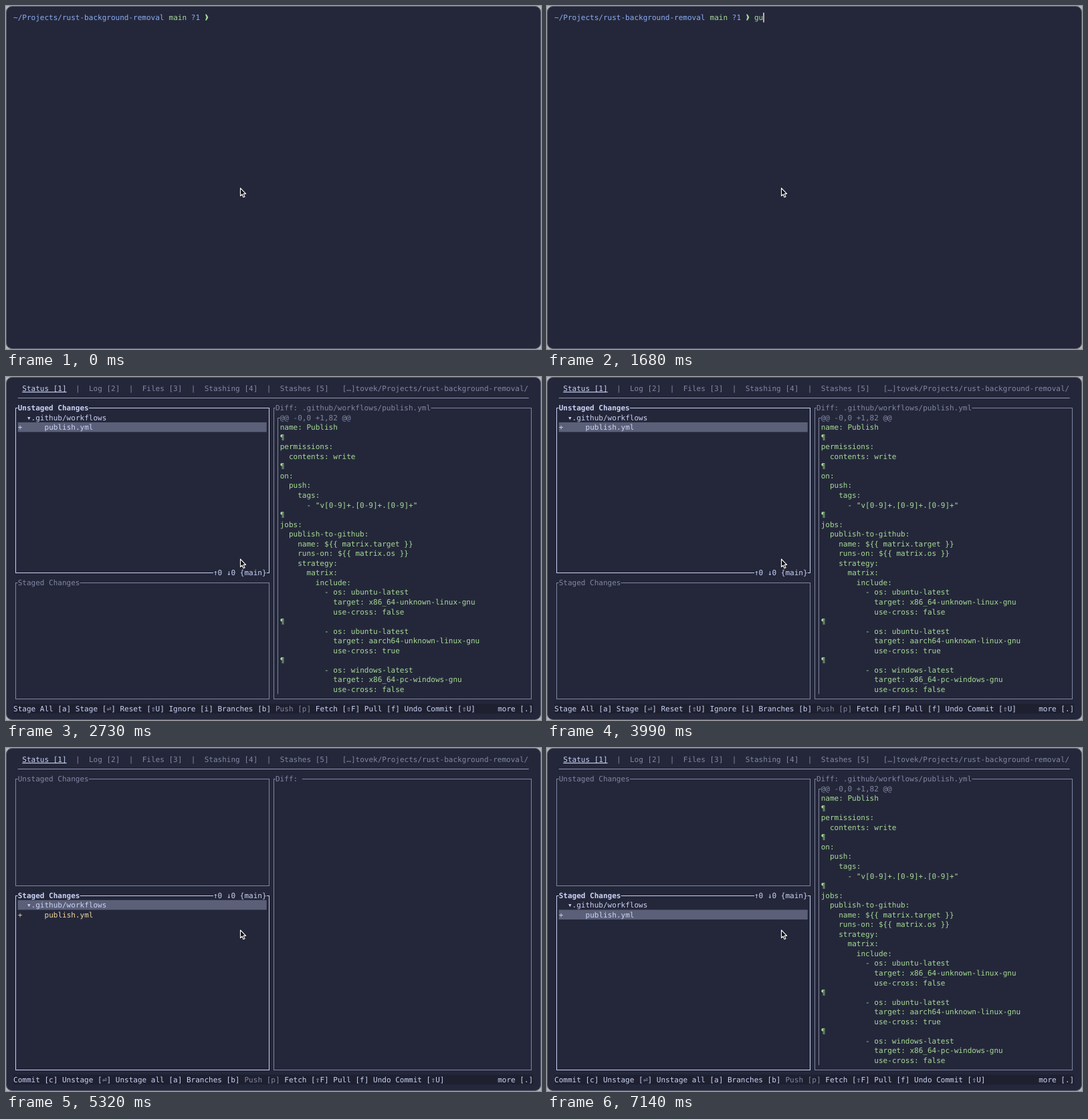
An HTML page for the animation above (8 s loop, 800x514 px).

```html
<!DOCTYPE html>
<html lang="en">
<head>
<meta charset="utf-8">
<title>Terminal git session</title>
<style>
  html, body { margin: 0; width: 100%; height: 100%; overflow: hidden; background: #b4b5ba; }
  svg { display: block; width: 800px; height: 514px; }
  text {
    font: 11.036px "DejaVu Sans Mono", "Noto Sans Mono", monospace;
    text-rendering: geometricPrecision;
    white-space: pre;
  }
  .bold { font-weight: bold; }
  .under { text-decoration: underline; }
</style>
</head>
<body>
<svg id="stage" viewBox="0 0 800 514"></svg>
<script>
const LOOP = 8000, CELL = 6.644, ROW = 14.545;
const C = {
  bg: '#24273a', bar: '#1e2030', text: '#cad3f5', dim: '#8087a2', rule: '#9197b3',
  sel: '#5b6078', green: '#a6da95', yellow: '#eed49f', blue: '#8aadf4', caret: '#f4dbd6'
};
const stage = document.getElementById('stage');
const X = col => 11 + col * CELL;
const Y = row => 17 + row * ROW;
const snap = v => Math.round(v) + 0.5;

function add(parent, tag, attrs = {}) {
  const el = document.createElementNS('http://www.w3.org/2000/svg', tag);
  for (const k in attrs) el.setAttribute(k, attrs[k]);
  parent.append(el);
  return el;
}

// Symbols get their own run so a fallback glyph cannot shift the grid.
function put(g, col, row, str, fill, cls = '') {
  const t = add(g, 'text', { y: Y(row) + 4, fill, class: cls });
  for (const m of str.matchAll(/[⇧⏎▾↑↓…¶]|[^⇧⏎▾↑↓…¶]+/g))
    add(t, 'tspan', { x: X(col + m.index) }).textContent = m[0];
}

function block(g, col, row, cols, fill) {
  add(g, 'rect', { x: X(col), y: Y(row) - ROW / 2, width: cols * CELL, height: ROW, fill });
}

function label(g, col, row, str, fill, cls) {
  block(g, col, row, str.length, C.bg);
  put(g, col, row, str, fill, cls);
}

function panel(g, c0, r0, c1, r1, title, active) {
  const x = snap(X(c0 + 0.5)), y = snap(Y(r0)), color = active ? C.text : C.dim;
  add(g, 'rect', {
    x, y, width: snap(X(c1 + 0.5)) - x, height: snap(Y(r1)) - y, fill: 'none', stroke: color
  });
  label(g, c0 + 1, r0, title, color, active ? 'bold' : '');
}

// Visible only inside the given [start, end] spans, with hard cuts.
function layer(parent, ...spans) {
  const g = add(parent, 'g');
  const keys = spans[0][0] > 0 ? [{ offset: 0, opacity: 0 }] : [];
  for (const [a, b] of spans)
    keys.push({ offset: a / LOOP, opacity: 1 }, { offset: b / LOOP, opacity: 0 });
  if (keys.at(-1).offset < 1) keys.push({ offset: 1, opacity: 0 });
  for (const k of keys) k.easing = 'step-end';
  g.animate(keys, { duration: LOOP, iterations: Infinity });
  return g;
}

function caret(col, ...spans) {
  add(layer(stage, ...spans), 'rect', { x: X(col), y: 10, width: 1.5, height: 14.5, fill: C.caret });
}

function tree(g, row, picked) {
  block(g, 1, row + picked, 56, C.sel);
  put(g, 3, row, '▾.github/workflows', C.text);
  const color = picked ? C.text : C.yellow;
  put(g, 1, row + 1, '+', color);
  put(g, 7, row + 1, 'publish.yml', color);
}

function commands(g, before, after) {
  const push = 'Push [p] ';
  put(g, 0, 33, before, C.text);
  put(g, before.length, 33, push, C.dim);
  put(g, before.length + push.length, 33, after, C.text);
}

add(stage, 'rect', { x: 0.5, y: 0.5, width: 799, height: 513, rx: 8.5, fill: C.bg, stroke: '#5b5e6d' });

// Shell prompt
const shell = layer(stage, [0, 1750]);
put(shell, 0, 0, '~/Projects/rust-background-removal', C.blue);
put(shell, 35, 0, 'main', C.green);
put(shell, 40, 0, '?1', C.blue);
add(shell, 'path', { d: 'M298 12.5h1.9l2.5 4.5-2.5 4.5H298l1.6-4.5z', fill: C.green });
put(layer(stage, [490, 1750]), 45, 0, 'g', C.green);
put(layer(stage, [490, 630]), 46, 0, 'u', C.sel);
put(layer(stage, [630, 1750]), 46, 0, 'u', C.green);
caret(45, [280, 490]);
caret(46, [490, 630]);
caret(47, [630, 1260], [1680, 1750]);

// Git interface: parts that stay
const ui = layer(stage, [1750, LOOP]);
const tabs = [[17, 'Log [2]'], [29, 'Files [3]'], [43, 'Stashing [4]'], [60, 'Stashes [5]']];
put(ui, 2, 0, 'Status [1]', C.text, 'under');
for (const [col, name] of tabs) {
  put(ui, col - 3, 0, '|', C.dim);
  put(ui, col, 0, name, C.dim);
}
put(ui, 74, 0, '[…]tovek/Projects/rust-background-removal/', C.dim);
add(ui, 'path', { d: `M${X(1)} 31.5H${X(116)}`, stroke: C.rule });
block(ui, 0, 33, 117, C.bar);
put(ui, 109, 33, 'more [.]', C.text);

// Focus on the unstaged list, then on the staged list
const branch = '↑0 ↓0 {main}';
const work = layer(ui, [1750, 5320]);
panel(work, 0, 2, 57, 19, 'Unstaged Changes', true);
panel(work, 0, 20, 57, 32, 'Staged Changes', false);
label(work, 45, 19, branch, C.text);
commands(work, 'Stage All [a] Stage [⏎] Reset [⇧U] Ignore [i] Branches [b] ',
  'Fetch [⇧F] Pull [f] Undo Commit [⇧U]');

const index = layer(ui, [5320, LOOP]);
panel(index, 0, 2, 57, 13, 'Unstaged Changes', false);
panel(index, 0, 14, 57, 32, 'Staged Changes', true);
label(index, 45, 14, branch, C.text);
commands(index, 'Commit [c] Unstage [⏎] Unstage all [a] Branches [b] ',
  'Fetch [⇧F] Pull [f] Undo Commit [⇧U]');

tree(layer(ui, [1750, 2730]), 3, 0);
tree(layer(ui, [2730, 5320]), 3, 1);
tree(layer(ui, [5320, 7000]), 15, 0);
tree(layer(ui, [7000, LOOP]), 15, 1);

// Diff panel
panel(layer(ui, [1750, 2730], [5320, 7000]), 58, 2, 116, 32, 'Diff: ', false);
const diff = layer(ui, [2730, 5320], [7000, LOOP]);
panel(diff, 58, 2, 116, 32, 'Diff: .github/workflows/publish.yml', false);
add(diff, 'path', {
  d: `M${X(60)} ${snap(Y(3))}H${snap(X(59.5))}V${Y(31.5)}`, fill: 'none', stroke: C.dim
});
put(diff, 60, 3, '@@ -0,0 +1,82 @@', C.dim);
const yml = `name: Publish
¶
permissions:
  contents: write
¶
on:
  push:
    tags:
      - "v[0-9]+.[0-9]+.[0-9]+"
¶
jobs:
  publish-to-github:
    name: \${{ matrix.target }}
    runs-on: \${{ matrix.os }}
    strategy:
      matrix:
        include:
          - os: ubuntu-latest
            target: x86_64-unknown-linux-gnu
            use-cross: false
¶
          - os: ubuntu-latest
            target: aarch64-unknown-linux-gnu
            use-cross: true
¶
          - os: windows-latest
            target: x86_64-pc-windows-gnu
            use-cross: false`;
yml.split('\n').forEach((line, i) => {
  const indent = line.search(/\S/);
  put(diff, 60 + indent, 4 + i, line.trim(), C.green);
});

// Mouse pointer
add(stage, 'path', {
  d: 'M350.5 272.8V284.6L353.1 282.2L355 286.6L357 285.7L355.1 281.4H358.6Z',
  fill: '#111', stroke: '#fff', 'stroke-width': 1.1, 'stroke-linejoin': 'round'
});
</script>
</body>
</html>
```
